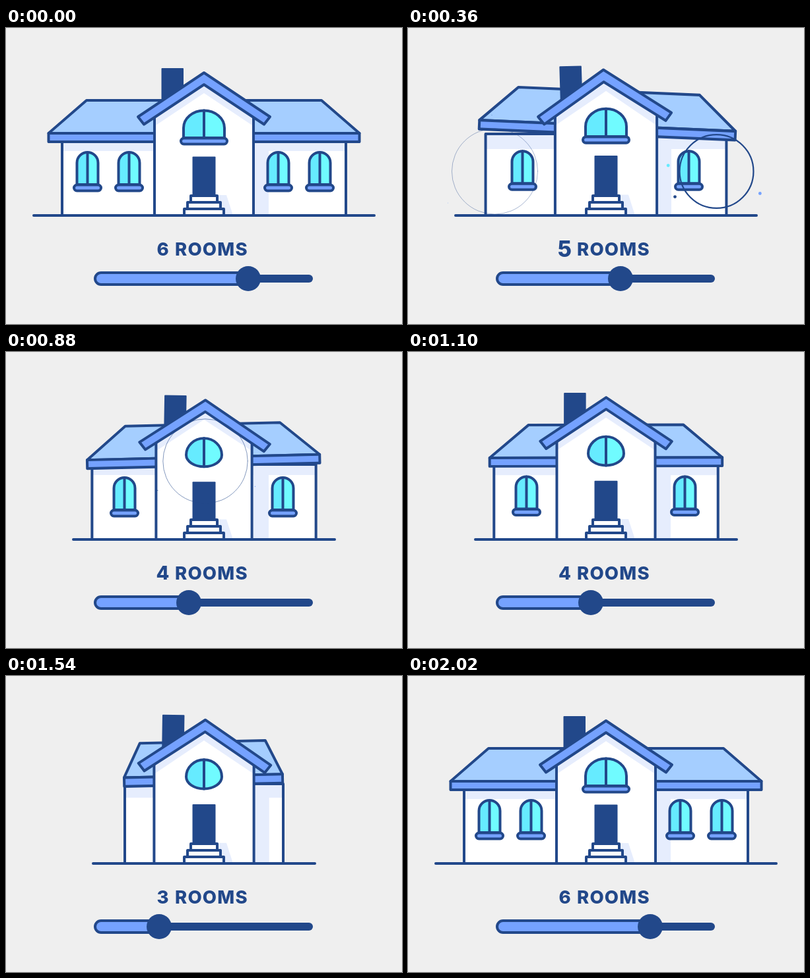
Animation, 600 px wide and 450 px high, one loop 2400 ms. Source, as an HTML page with a canvas:

```html
<!DOCTYPE html>
<html lang="en">
<head>
<meta charset="utf-8">
<title>Rooms slider</title>
<style>
html, body { margin: 0; width: 100%; height: 100%; overflow: hidden; background: #efefef; }
canvas { display: block; }
</style>
</head>
<body>
<canvas id="stage" width="600" height="450"></canvas>
<script>
const ctx = document.getElementById('stage').getContext('2d');
const NAVY = '#22488a', TRIM = '#75a2ff', ROOF = '#a5ceff', SHADE = '#e6edfd';
const GLASS = '#66ebff', SHINE = '#70fbff', WHITE = '#fff', BG = '#efefef';
const LOOP = 2400, MID = 300, GROUND = 285, WINDOW_MID = 299.5;

// One value for each room count: 6, 5, 4, 3
const STATES = {
  ground: [258, 228, 198, 168],
  wall: [215, 178, 169.5, 120],
  eave: [235.5, 188.5, 176, 120],
  ridge: [178, 132, 117, 95],
  inner: [113, 126, 120, 101],
  outer: [176, 168, 168, 168],
  knob: [367, 322, 277, 232]
};
const DRAG = [20, 560, 1100], MORPH = [70, 560, 1080], END = [540, 1080, 1620];
const BACK = 1800, BACK_TIME = 220;

// Keys are [ms since the morph began, value]
const KEYS = {
  width: [[0, 0], [90, -.03], [215, 1.12], [240, 1.1], [290, .88], [330, 1], [400, 1.02], [460, 1]],
  turn: [[0, 0], [130, -.35], [225, 1], [245, 1], [290, .5], [325, -.3], [390, -.4], [460, -.25], [530, 0]],
  lift: [[0, 0], [100, -.7], [190, 1.6], [240, 1], [290, .35], [322, -.4], [400, -.1], [460, .1], [520, 0]],
  rise: [[0, 0], [100, -.2], [210, 1.2], [240, 1], [290, .5], [322, 0], [390, .1], [460, .35], [530, 0]],
  pop: [[0, 1], [170, 1], [215, 1.65], [240, 1.52], [290, 1.22], [320, 1.05], [350, 1]]
};

const LEFT_RAYS = [[-54, GLASS], [146, TRIM], [-93, NAVY]];
const RIGHT_RAYS = [[187, GLASS], [148.5, NAVY], [27, TRIM]];
const BURSTS = [
  { start: 174, place: 'outer', side: -1, rays: LEFT_RAYS },
  { start: 239, place: 'outer', side: 1, rays: RIGHT_RAYS },
  { start: 1231, place: 'inner', side: -1, rays: LEFT_RAYS },
  { start: 1172, place: 'inner', side: 1, rays: RIGHT_RAYS },
  { start: 705, place: 'inner', side: 0, rays: RIGHT_RAYS }
];

const clamp = v => Math.max(0, Math.min(1, v));
const smooth = v => (v = clamp(v), v * v * (3 - 2 * v));
const mix = (a, b, k) => a + (b - a) * k;

function keyed(keys, time) {
  let i = 1;
  while (i < keys.length - 1 && time > keys[i][0]) i++;
  const [t0, v0] = keys[i - 1], [t1, v1] = keys[i];
  return mix(v0, v1, smooth((time - t0) / (t1 - t0)));
}

function paint(fill, width = 4) {
  if (fill) { ctx.fillStyle = fill; ctx.fill(); }
  if (width) { ctx.lineWidth = width; ctx.strokeStyle = NAVY; ctx.stroke(); }
}
function poly(points, fill, width) {
  ctx.beginPath();
  points.forEach(([x, y]) => ctx.lineTo(x, y));
  ctx.closePath();
  paint(fill, width);
}
function box(x, y, w, h, fill, width, radius = 0) {
  ctx.beginPath();
  ctx.roundRect(x, y, w, h, radius);
  paint(fill, width);
}
function line(x0, y0, x1, y1, width = 4) {
  ctx.beginPath();
  ctx.moveTo(x0, y0);
  ctx.lineTo(x1, y1);
  paint(null, width);
}
function disc(x, y, r, fill) {
  ctx.beginPath();
  ctx.arc(x, y, r, 0, 7);
  paint(fill, 0);
}
function group(draw) {
  ctx.save();
  draw();
  ctx.restore();
}
function rotate(degrees, x, y) {
  ctx.translate(x, y);
  ctx.rotate(degrees * Math.PI / 180);
  ctx.translate(-x, -y);
}
function stretch(scale, y) {
  ctx.translate(0, y);
  ctx.scale(1, scale);
  ctx.translate(0, -y);
}

// Arched pane around x = 0; rx and ry round the lower corners
function pane(half, top, mid, bottom, rx, ry) {
  ctx.beginPath();
  ctx.ellipse(0, mid, half, mid - top, 0, Math.PI, 0);
  ctx.ellipse(half - rx, bottom - ry, rx, ry, 0, 0, Math.PI / 2);
  ctx.ellipse(rx - half, bottom - ry, rx, ry, 0, Math.PI / 2, Math.PI);
  ctx.closePath();
  group(() => {
    ctx.clip();
    ctx.fillStyle = GLASS;
    ctx.fillRect(-half, top, half, bottom - top);
    ctx.fillStyle = SHINE;
    ctx.fillRect(0, top, half, bottom - top);
  });
  paint(null);
  line(0, top, 0, bottom);
}

function sideWindow(x, y, scale) {
  if (scale < .01) return;
  group(() => {
    ctx.translate(x, 218 + y);
    ctx.scale(scale, scale);
    ctx.translate(0, -218);
    pane(16, 189, 205, 238, 1, 1);
    box(-20.5, 238.5, 41, 9, TRIM, 4, 4.5);
  });
}

function pose(t) {
  const p = { time: t, turn: 0, lift: 0, rise: 0, pop: 1, grip: 0 };
  // Walls and roof overshoot; ground and side windows glide
  const blend = (from, to, width, glide, drag) => {
    const pace = { ground: glide, inner: glide, outer: glide, knob: drag };
    for (const name in STATES) {
      p[name] = mix(STATES[name][from], STATES[name][to], pace[name] ?? width);
    }
    p.grip = Math.sin(Math.PI * drag);
  };
  p.back = smooth((t - BACK) / BACK_TIME);
  if (t >= BACK) {
    blend(3, 0, p.back, p.back, p.back);
    p.rooms = Math.round(3 + 3 * p.back);
    p.round = 1 - p.back;
    return p;
  }
  const i = t < END[0] + 20 ? 0 : t < END[1] ? 1 : 2;
  const time = t - MORPH[i], calm = clamp((END[i] - t) / 60);
  blend(i, i + 1, keyed(KEYS.width, time), smooth((time - 80) / 140), smooth((t - DRAG[i]) / 80));
  for (const name of ['turn', 'lift', 'rise']) p[name] = keyed(KEYS[name], time) * calm;
  p.pop = keyed(KEYS.pop, time);
  p.rooms = 6 - i - (time > 185 ? 1 : 0);
  p.round = smooth((t - 690) / 90);
  return p;
}

function sideWings(p) {
  const { wall, eave, ridge } = p, top = 171 - 20 * p.rise;
  box(MID - wall, top, 2 * wall, GROUND - top, WHITE, 0);
  box(MID - wall, top, 2 * wall, 16 + 14 * p.rise, SHADE, 0);
  box(375, top, 23 + 2 * p.rise, GROUND - top, SHADE, 0);
  box(MID - wall, top, 2 * wall, GROUND - top);

  const seen = start => Math.max(1 - smooth((p.time - start + 60) / 80), p.back);
  for (const b of BURSTS) {
    if (b.side) sideWindow(WINDOW_MID + b.side * p[b.place], -5 * p.lift, seen(b.start));
  }

  group(() => {
    rotate(5 * p.turn, MID, 200);
    ctx.translate(MID, -22 * p.rise);
    stretch(1 + .1 * p.rise, 173);
    poly([[-eave, 160], [-ridge, 110], [ridge, 110], [eave, 160]], ROOF);
    box(-eave, 160, 2 * eave, 13, TRIM);
  });
}

function centre(p) {
  const spread = 6 * p.lift, half = 75 + spread;
  const raised = (amount, draw) => group(() => {
    ctx.translate(MID, 0);
    stretch(1 + amount * p.lift, GROUND);
    draw();
  });
  const turned = draw => raised(.06, () => {
    rotate(-3.4 * p.turn, 0, 200);
    draw();
  });

  turned(() => box(-64.5 - spread, 61, 33.5, 50, NAVY, 0, 1));
  raised(.05, () => {
    const outline = [[-half, GROUND], [-half, 130], [0, 78], [half, 130], [half, GROUND]];
    poly(outline, WHITE, 0);
    group(() => {
      ctx.clip();
      poly([[-91, 147], [0, 86], [91, 147], [91, 160], [0, 99], [-91, 160]], SHADE, 0);
    });
    poly(outline);

    const r = p.round;
    pane(mix(31, 27, r), mix(125.5, 128, r), mix(152, 154, r), mix(167, 172, r), mix(1, 27, r), mix(1, 18, r));
    if (r < .99) {
      const w = 35 * (1 - r);
      box(-w, 167.5, 2 * w, 9 * (1 - r), TRIM, 4 * (1 - r), 4.5 * (1 - r));
    }
    poly([[20, 254], [34, 254], [44, GROUND], [20, GROUND]], SHADE, 0);
    box(-17.5, 195.5, 35, 60, NAVY, 0, 1);
  });
  for (let i = 0; i < 3; i++) box(MID - 20 - 5 * i, 255 + 10 * i, 40 + 10 * i, 10, WHITE);
  turned(() => {
    const a = 100 + spread / 2, b = a - 9;
    poly([[-a, 135], [0, 68], [a, 135], [b, 146.5], [0, 86], [-b, 146.5]], TRIM);
  });
}

function burst(b, p) {
  const u = (p.time - b.start) / 270;
  if (u <= 0 || u >= 1) return;
  const r = 67 * (1 - (1 - u) ** 3);
  const x = b.side ? WINDOW_MID + b.side * p[b.place] : 302, y = b.side ? 218 : 166;
  ctx.beginPath();
  ctx.arc(x, y, r, 0, 7);
  paint(null, Math.min(4, .2 * (67 - r)));
  for (const [angle, color] of b.rays) {
    const a = angle * Math.PI / 180, d = 1.32 * r;
    disc(x + d * Math.cos(a), y + d * Math.sin(a), Math.min(4.5, .22 * (67 - r)), color);
  }
}

function slider(p) {
  line(p.knob, 381, 459, 381, 12);
  box(135, 372, p.knob - 135, 18, TRIM, 4, 9);
  disc(p.knob, 381, 19 + 3 * p.grip, NAVY);
}

function label(p) {
  ctx.fillStyle = NAVY;
  ctx.font = '800 27.5px Inter, Lato, sans-serif';
  ctx.letterSpacing = '1.2px';
  ctx.textAlign = 'left';
  ctx.fillText('ROOMS', 256, 346);
  group(() => {
    ctx.translate(237.5, 336);
    ctx.scale(p.pop, p.pop);
    ctx.letterSpacing = '0px';
    ctx.textAlign = 'center';
    ctx.fillText(p.rooms, 0, 10);
  });
}

function draw(t) {
  const p = pose(t);
  ctx.fillStyle = BG;
  ctx.fillRect(0, 0, 600, 450);
  ctx.lineJoin = ctx.lineCap = 'round';
  sideWings(p);
  centre(p);
  line(MID - p.ground, GROUND, MID + p.ground, GROUND);
  BURSTS.forEach(b => burst(b, p));
  slider(p);
  label(p);
}

const began = performance.now();
function tick() {
  draw((performance.now() - began) % LOOP);
  requestAnimationFrame(tick);
}
tick();
</script>
</body>
</html>
```
